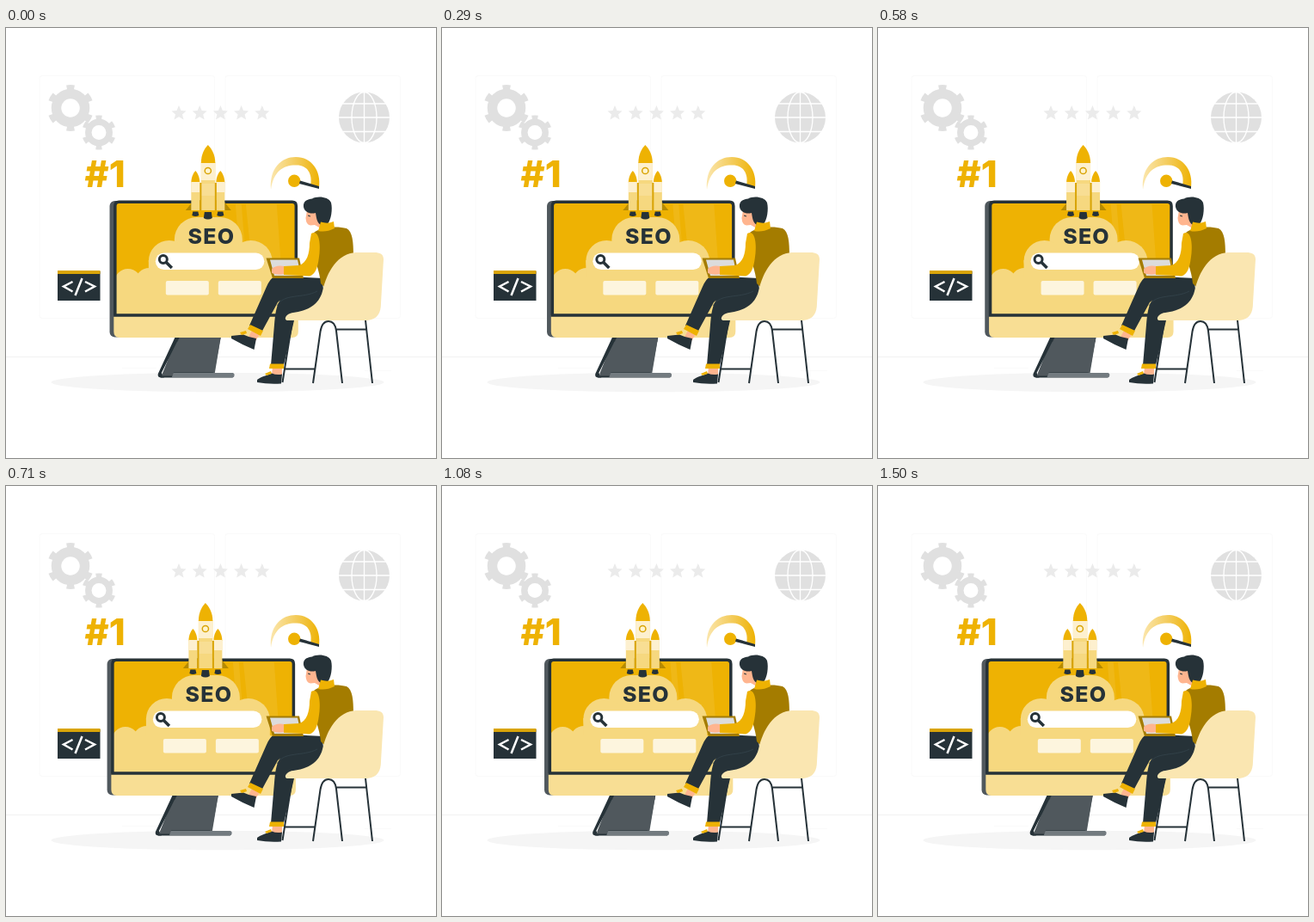
Write an HTML page that moves like this. It is 500 px wide and 500 px high and loops after 1540 ms.

```html
<!DOCTYPE html>
<html lang="en">
<head>
<meta charset="utf-8">
<style>
  html, body { margin: 0; width: 100%; height: 100%; overflow: hidden; background: #fff }
  svg { display: block; width: 100%; height: 100% }
  text { font-family: Inter, sans-serif }
  .gold { fill: #eeb203 }
  .bronze { fill: #a47c00 }
  .dark { fill: #263238 }
  .steel { fill: #50585d }
  .pale { fill: #f6d87f }
  .cream { fill: #fdf0cf }
  .skin { fill: #ffb58f }
  .line { fill: none; stroke: #263238 }
  .white { fill: none; stroke: #fff }
</style>
</head>
<body>
<svg viewBox="0 0 500 500">
  <defs>
    <linearGradient id="dial">
      <stop offset="0" stop-color="#fbe6ad"/>
      <stop offset=".55" stop-color="#f3ca56"/>
      <stop offset="1" stop-color="#eeb203"/>
    </linearGradient>
    <g id="booster">
      <path class="gold" d="M-5 180C-5 173-2 168 0 166C2 168 5 173 5 180Z"/>
      <path class="pale" d="M-5 179H5V212H-5Z"/>
      <path class="cream" d="M-5 179H5V191H-5Z"/>
      <path class="dark" d="M-3 213.500H3L4 218Q0 220-4 218Z"/>
    </g>
    <path id="star" d="M0-9L2.500-3 8.500-2.500 4 1.500 5.500 7.500 0 4.300-5.500 7.500-4 1.500-8.500-2.500-2.500-3Z"/>
  </defs>

  <!-- backdrop -->
  <g fill="none" stroke="#fafafa">
    <rect x="39" y="55.500" width="203.500" height="282" rx="3"/>
    <rect x="255" y="55.500" width="203.500" height="282" rx="3"/>
    <path stroke="#f2f2f2" d="M0 382.500H500"/>
    <path d="M417 398.500H448M135 395.500H175M385 390.500H393"/>
  </g>
  <ellipse cx="246" cy="412" rx="193.500" ry="11.300" fill="#f5f5f5"/>
  <g fill="none" stroke="#e0e0e0">
    <circle cx="75" cy="93" r="16.500" stroke-width="11.500"/>
    <circle cx="75" cy="93" r="24" stroke-width="6" pathLength="6" stroke-dasharray=".36 .64" stroke-dashoffset="-.32"/>
    <circle cx="108" cy="121.500" r="12.200" stroke-width="7.500"/>
    <circle cx="108" cy="121.500" r="17.500" stroke-width="5" pathLength="6" stroke-dasharray=".38 .62" stroke-dashoffset="-.31"/>
  </g>
  <g fill="#ebebeb">
    <use href="#star" x="201" y="99"/>
    <use href="#star" x="225.200" y="99"/>
    <use href="#star" x="249.400" y="99"/>
    <use href="#star" x="273.600" y="99"/>
    <use href="#star" x="297.800" y="99"/>
  </g>
  <circle cx="416.500" cy="104" r="29.500" fill="#e0e0e0"/>
  <g class="white" stroke-width="1.300">
    <ellipse cx="416.500" cy="104" rx="14.500" ry="29.500"/>
    <path d="M416.500 74V134M387 104H446M390 88H443M390 120.500H443"/>
  </g>
  <text class="gold" x="91.500" y="185" font-size="43" font-weight="800">#1</text>
  <path fill="url(#dial)" d="M308 188C306 163 320 150 337 150C355 150 367 166 364 186L354 184C357 169 350 159.500 338 159.500C323 159 311 166 308 188Z"/>
  <circle class="gold" cx="335.200" cy="177.800" r="7.200"/>
  <path class="dark" d="M342 177.500L364 184V187L341 181Z"/>
  <path class="dark" d="M60 283H109.500V317H60Z"/>
  <path fill="#d9a406" d="M60 282H109.500V286H60Z"/>
  <path class="white" stroke-width="2.500" d="M77.500 295L67 300.500 77.500 306.500M88.500 291L80.500 311M92 295L103 300.500 92 306.500"/>

  <g id="monitor">
    <path class="steel" d="M199 359H250L242 402H182Z"/>
    <path fill="#3c454a" d="M199 359H250L249 365H197Z"/>
    <path class="dark" d="M197 359H202L181 401L184 406.500H180Q176 406 177 402Z"/>
    <path class="steel" d="M202 360L181 405H196L243 401L249 365V360Z"/>
    <path class="dark" d="M180 404.500H264V406.500H180ZM195 400.500H241V401.500H195Z"/>
    <path fill="#737b80" d="M195 401H264Q267 402 265 406H193Z"/>
    <rect x="120.700" y="201" width="16" height="158.500" rx="6" class="steel"/>
    <path fill="#f8de94" d="M125.500 334H340V353Q340 360 333 360H132Q125.500 360 125.500 353Z"/>
    <path class="gold" d="M128 204H337V333H128Z"/>
    <path fill="#fff" opacity=".08" d="M267 205H274L284 333H277ZM279 205H315L324 333H292Z"/>
    <g class="pale">
      <rect x="196" y="220" width="79" height="60" rx="26"/>
      <circle cx="190" cy="271" r="24"/>
      <circle cx="285" cy="272" r="25"/>
      <circle cx="142" cy="296" r="16"/>
      <circle cx="167" cy="296" r="17"/>
      <path d="M166 270H310V290L336 296V333H128V290H166Z"/>
    </g>
    <path class="line" stroke-width="3.500" d="M127 334V207Q127 202.300 131.500 202.300H333Q337.500 202.300 337.500 207V334Z"/>

    <path fill="#b58a00" d="M218 201L209 212H262L253 201Z"/>
    <use href="#booster" x="220.500"/>
    <use href="#booster" x="249.500"/>
    <path class="dark" d="M231 214H239L240 221Q235 224 230 221Z"/>
    <path class="pale" d="M227 156H243.500V212H227Z"/>
    <path class="cream" d="M227 156H243.500V177H227Z"/>
    <path fill="#f8de94" d="M227 181H243.500V195H227Z"/>
    <path fill="#d9a406" d="M225.500 180H227.500V212H225.500ZM243 180H245V212H243Z"/>
    <path class="gold" d="M227 157C227 147 231 140 235 136C239 140 243.500 147 243.500 157Z"/>
    <circle cx="235" cy="166" r="3.600" fill="#fff4d0" stroke="#d9a406" stroke-width="1.500"/>

    <text class="dark" x="239" y="251" font-size="25" font-weight="800" letter-spacing="1.200" text-anchor="middle">SEO</text>
    <rect x="174" y="261.500" width="126.500" height="19.500" rx="9.750" fill="#fff"/>
    <circle class="line" stroke-width="3" cx="183" cy="269" r="4.500"/>
    <path class="line" stroke-width="3.500" d="M186.500 272.500L193 279"/>
    <g fill="#fdf5de">
      <rect x="186" y="294" width="50" height="16.500" rx="2"/>
      <rect x="247" y="294" width="50" height="16.500" rx="2"/>
    </g>
  </g>

  <!-- chair legs -->
  <path class="line" stroke-width="2" d="M333 340L321.500 412M357 413L365.500 353Q367.500 341 375 341Q382.500 341 384 352L391 413M418 340L426 413M324 396.500H359M384 350.500H419"/>

  <!-- person -->
  <path class="skin" d="M310 393H321V404H309ZM286 352L295 356 290 364 282 359Z"/>
  <path class="dark" d="M292 409C297 405 304 404 309 401.500Q315 404 321 402.500L320 413.500Q305 414.500 292 412ZM262 358Q269 357 276 356.500Q283 360 291 361L288.500 374Q274 368 262 361Z"/>
  <path class="dark" d="M368 298L322 313C314 319 313 334 312 345L308 392H323L335 340C352 334 368 330 370 308Z"/>
  <path class="dark" d="M369 291L318 288.500C309 288 306 294 302 303L283 346 297 354 316 319C326 309 352 316 368 302Z"/>
  <path fill="none" stroke="#37474f" stroke-width=".7" d="M315 323C323 308 345 315 362 306"/>
  <path class="gold" d="M284 345L299 352 296 358 281 350ZM307 390.500H323V396H306ZM272 354L279 352 280 355 274 357ZM301 402L308 399 309 402 303 404Z"/>
  <path class="bronze" d="M358 238C365 231 386 230 396 233C403 237 404 248 404 266L373 304 366 297C365 282 357 268 357 250Z"/>
  <path class="skin" d="M350 212L348.500 221Q349 229 354 229.500L359 229 366 233 368 217 360 212Z"/>
  <path class="dark" d="M346 208C345 201 351 199 356 198.500C362 195 375 196 378 203C380 211 378 223 374 228L366 229C361 226 361 220 360 215C354 217 347 214 346 208Z"/>
  <path class="line" d="M351 218L354 219"/>
  <path class="gold" d="M366 225.500Q374 228 381 225L382 233Q372 238 363 236Z"/>
  <path class="bronze" d="M302.500 267.500H341L346 291H310Z"/>
  <path fill="#dcdcdc" d="M307 269.500H339L343 288H312Z"/>
  <path class="skin" d="M309 280Q314 275 324 277V286Q316 288 309 285Z"/>
  <path class="gold" d="M355 239C363 234 366 248 364.500 262C363 276 361 286 353 288.500L323 287V277L341 276C350 273 353 262 353 250Z"/>

  <path fill="#fae6b1" d="M439 269C439 263 435 261 428 261H407C386 262 373 283 368 306C364 322 350 329 334 331C325 332 322 340 328 340H420C432 339 436 331 436 320Z"/>
</svg>
<script>
  const monitor = document.getElementById('monitor');
  const stops = [0, -1, 2, -4, 4, -4, 4, -4, 2, -1, 0];
  const FPS = 24, FRAMES = 37, SHAKE = 1500, LEAD = 25;

  // Linear shake between evenly spaced stops
  function offset(time) {
    const step = (time % SHAKE) / SHAKE * (stops.length - 1);
    const i = Math.floor(step);
    return stops[i] + (stops[i + 1] - stops[i]) * (step - i);
  }

  const start = performance.now();
  function draw() {
    const time = (performance.now() - start) % 1540;
    const frame = Math.min(FRAMES - 1, Math.floor((time + 5) * FPS / 1000));
    monitor.setAttribute('transform', `translate(${offset(frame * 1000 / FPS + LEAD).toFixed(2)})`);
    requestAnimationFrame(draw);
  }
  draw();
</script>
</body>
</html>
```
